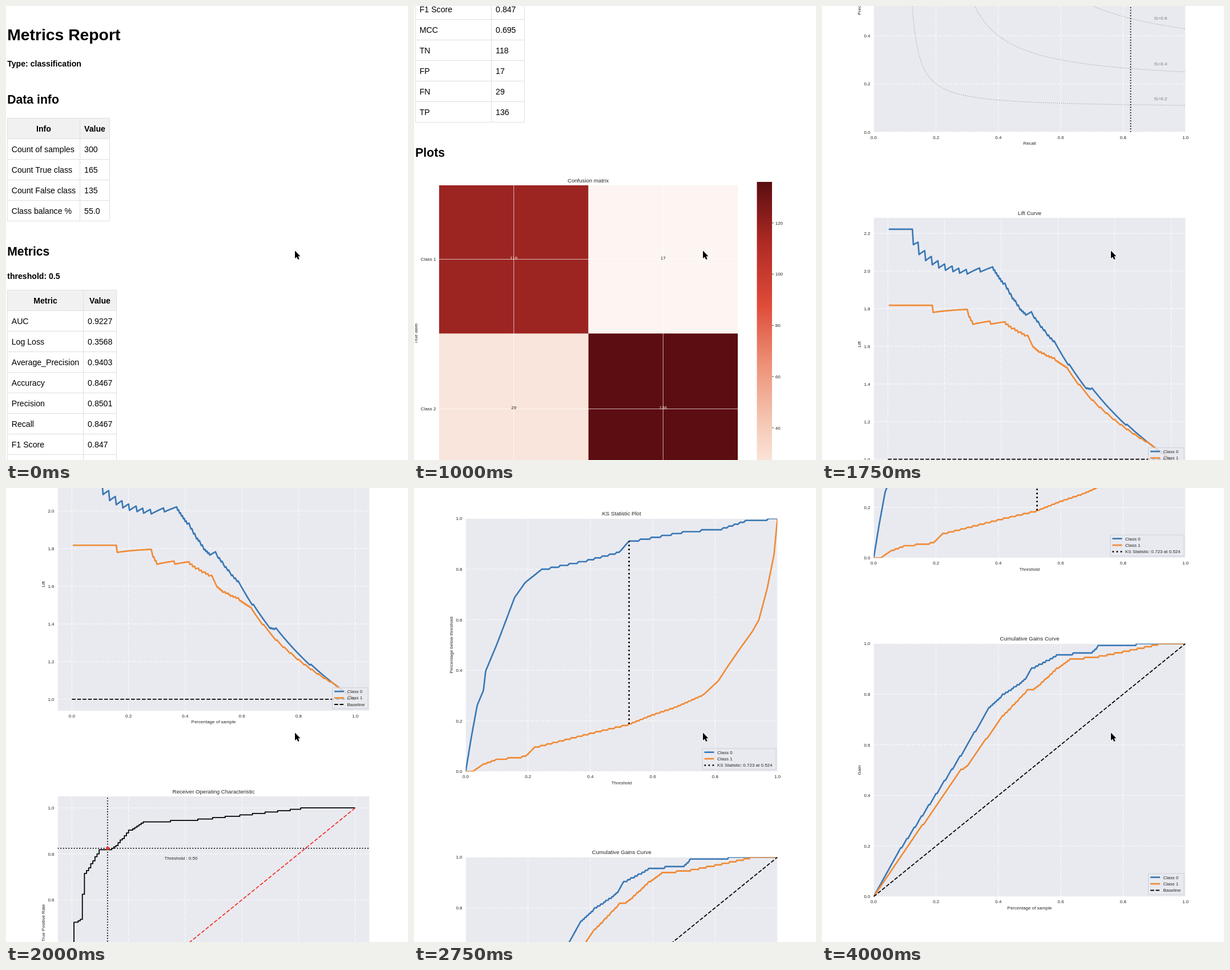
An HTML page with a canvas for the animation above (4.25 s loop, 704 by 795 pixels).

```html
<!DOCTYPE html>
<html lang="en">
<head>
<meta charset="utf-8">
<title>Metrics Report</title>
<style>
  html, body { margin: 0; width: 100%; height: 100%; overflow: hidden; background: #fff; }
  canvas { display: block; }
</style>
</head>
<body>
<canvas id="stage" width="704" height="795"></canvas>
<script>
const ctx = document.getElementById('stage').getContext('2d');
const BLUE = '#3a78b4', ORANGE = '#f08b36', RED = '#f0352b', INK = '#262626';
const LEFT = 90.5, WIDTH = 546, HEIGHT = 443;

// Linear interpolation through [input, output] key points
function interpolate(keys, v) {
  const i = keys.findIndex(([at]) => at >= v);
  if (i < 0) return keys[keys.length - 1][1];
  if (i === 0) return keys[0][1];
  const [[a, from], [b, to]] = [keys[i - 1], keys[i]];
  return from + (to - from) * (v - a) / (b - a);
}

// y is the middle of the capital letters
function text(str, x, y, { size = 8, align = 'left', color = INK, bold = false, angle = 0 } = {}) {
  ctx.save();
  ctx.translate(x, y);
  ctx.rotate(angle);
  ctx.font = `${bold ? 'bold ' : ''}${size}px "Liberation Sans", Arial, sans-serif`;
  ctx.textAlign = align;
  ctx.fillStyle = color;
  ctx.fillText(str, 0, size * 0.358);
  ctx.restore();
}

function line(points, color = '#000', width = 1.6, dash = []) {
  ctx.strokeStyle = color;
  ctx.lineWidth = width;
  ctx.lineJoin = 'round';
  ctx.setLineDash(dash.map(d => d * width));
  ctx.beginPath();
  points.forEach(([x, y]) => ctx.lineTo(x, y));
  ctx.stroke();
  ctx.setLineDash([]);
}

function box(x, y, w, h, fill, stroke) {
  ctx.fillStyle = fill;
  ctx.fillRect(x, y, w, h);
  if (!stroke) return;
  ctx.strokeStyle = stroke;
  ctx.lineWidth = 1;
  ctx.strokeRect(x, y, w, h);
}

function clipTo(x, y, w, h, draw) {
  ctx.save();
  ctx.beginPath();
  ctx.rect(x, y, w, h);
  ctx.clip();
  draw();
  ctx.restore();
}

function table(top, divider, right, rows) {
  const left = 2.5, row = 36, bottom = top + row * rows.length;
  const cell = { size: 14.15, color: '#000' }, head = { ...cell, bold: true, align: 'center' };
  box(left, top, right - left, row, '#f1f1f1');
  rows.forEach(([name, value], i) => {
    const y = top + row * i, mid = y + 18.5;
    line([[left, y], [right, y]], '#dfdfdf', 1);
    text(name, i ? 9.7 : (left + divider) / 2, mid, i ? cell : head);
    text(value, i ? divider + 7.6 : (divider + right) / 2, mid, i ? cell : head);
  });
  line([[left, bottom], [right, bottom]], '#dfdfdf', 1);
  [left, divider, right].forEach(x => line([[x, top], [x, bottom]], '#dfdfdf', 1));
}

function heading(str, y, size) {
  text(str, 2.2, y, { size, bold: true, color: '#000' });
}

function confusionMatrix(top) {
  const left = 44, side = 261.5, grid = '#ffffffb0';
  const cells = [[[118, '#9c2522'], [17, '#fdf5f1']], [[29, '#f9e5db'], [136, '#5c0d11']]];
  const colX = c => left + side * (c + .5), rowY = r => top + 129.5 + 262 * r;
  text('Confusion matrix', 305, top - 8.5, { size: 9.6, align: 'center' });
  cells.forEach((row, r) => row.forEach(([, color], c) =>
    box(left + side * c, top + 259.5 * r, side, 263, color)));
  for (const i of [0, 1]) {
    line([[colX(i), top], [colX(i), top + 522]], grid, 1);
    line([[left, rowY(i)], [left + 2 * side, rowY(i)]], grid, 1);
    text(`Class ${i + 1}`, 38.5, rowY(i), { align: 'right' });
  }
  cells.forEach((row, r) => row.forEach(([n], c) =>
    text(n, colX(c), rowY(r) - 2.5, { align: 'center', color: n > 100 ? '#f6e6e2' : INK })));
  clipTo(2, top, 20, 523, () =>
    text('True label', 2.8, top + 259.5, { align: 'center', angle: -Math.PI / 2 }));

  const barTop = top - 6, barHeight = 534;
  const fade = ctx.createLinearGradient(0, barTop, 0, barTop + barHeight);
  ['#5a0d11', '#af2a24', '#de4a38', '#ed9277', '#f5cab8', '#fff5f0']
    .forEach((color, i) => fade.addColorStop(i / 5, color));
  box(600.5, barTop, 26.5, barHeight, fade);
  for (let n = 20; n <= 120; n += 20) {
    const y = barTop + (136 - n) * 4.487;
    line([[627, y], [630, y]], INK, 0.8);
    text(n, 632.7, y);
  }
}

// Dash patterns are in units of the line width
const DOTS = [1, 1.65], DASHES = [3.7, 1.6], DASH_DOT = [6.4, 1.6, 1, 1.6];

// Draws axes and grid, then calls draw with a data-to-pixel mapping
function chart(top, { title, xLabel, yLabel, xLim = [0, 1], yLim = [0, 1], yTicks = [0, 1], legend }, draw) {
  const bottom = top + HEIGHT, middle = LEFT + WIDTH / 2;
  const X = v => LEFT + WIDTH * (v - xLim[0]) / (xLim[1] - xLim[0]);
  const Y = v => bottom - HEIGHT * (v - yLim[0]) / (yLim[1] - yLim[0]);
  const ticks = (from, to, mark) => { for (let v = from; v < to + .01; v += .2) mark(v); };
  const plot = (points, ...style) => line(points.map(([x, y]) => [X(x), Y(y)]), ...style);

  clipTo(LEFT, top, WIDTH, HEIGHT, () => {
    box(LEFT, top, WIDTH, HEIGHT, '#e9eaf0');
    ticks(0, 1, v => line([[X(v), bottom], [X(v), top]], '#fff', .89, DASH_DOT));
    ticks(...yTicks, v => line([[LEFT, Y(v)], [LEFT + WIDTH, Y(v)]], '#fff', .89, DASH_DOT));
    draw(plot, X, Y);
  });

  ticks(0, 1, v => text(v.toFixed(1), X(v), bottom + 9, { align: 'center' }));
  ticks(...yTicks, v => text(v.toFixed(1), 84.5, Y(v), { align: 'right' }));
  text(title, middle, top - 8.5, { size: 9.6, align: 'center' });
  text(xLabel, middle, bottom + 19.5, { align: 'center' });
  text(yLabel, 65, top + HEIGHT / 2, { align: 'center', angle: -Math.PI / 2 });

  if (!legend) return;
  const first = bottom - 11 - 11.4 * (legend.items.length - 1);
  box(legend.left, first - 6.5, 634 - legend.left, bottom + 3 - first, '#e9eaf0cc', '#cfcfd6');
  legend.items.forEach(([label, color, width, dash, marker], i) => {
    const y = first + 11.4 * i, x = legend.left + 3.5;
    line([[x, y], [x + 17, y]], color, width, dash);
    if (marker) box(x + 5.5, y - 3, 6, 6, '#000');
    text(label, legend.left + 26, y);
  });
}

// Samples ranked by score: the walk of [negatives, positives] passes these corners
const TOTAL = 300, POSITIVE = 165, NEGATIVE = 135;
const CORNERS = [[0, 0], [0, 47], [1, 83], [5, 86], [5, 103], [6, 118], [13, 135], [17, 135],
  [20, 137], [27, 149], [34, 155], [60, 157], [92, 162], [109, 165], [135, 165]];

function walk(corners) {
  const path = [[0, 0]];
  let [fp, tp] = path[0];
  corners.slice(1).forEach(([fpEnd, tpEnd], i) => {
    const [fpStart, tpStart] = corners[i];
    const climb = goal => { while (tp < goal) path.push([fp, ++tp]); };
    while (fp < fpEnd) {
      path.push([++fp, tp]);
      climb(Math.floor(tpStart + (tpEnd - tpStart) * (fp - fpStart) / (fpEnd - fpStart)));
    }
    climb(tpEnd);
  });
  return path;
}

const ranked = walk(CORNERS);
const gain1 = ranked.map(([, tp], n) => [n / TOTAL, tp / POSITIVE]);
const gain0 = ranked.map((_, n) => [n / TOTAL, 1 - ranked[TOTAL - n][0] / NEGATIVE]);
const lift = gain => gain.slice(1).map(([x, g]) => [x, g / x]);
const roc = ranked.map(([fp, tp]) => [fp / NEGATIVE, tp / POSITIVE]);
const precision = ranked.map(([, tp], n) => [tp / POSITIVE, n ? tp / n : 1]);

// Share of samples below a score, rising one sample at a time; keys are [share, score]
function shareBelow(keys, count) {
  const curve = [[0, 0]];
  for (let k = 1; k <= count; k++) {
    const score = interpolate(keys, k / count), [last] = curve[curve.length - 1];
    curve.push([Math.max(last, score - .006), (k - 1) / count], [score, k / count]);
  }
  return [...curve, [1, 1]];
}
const below0 = shareBelow([[0, 0], [.135, .018], [.262, .037], [.321, .057], [.397, .064], [.506, .101],
  [.6, .13], [.688, .157], [.749, .192], [.8, .244], [.837, .392], [.87, .495], [.911, .524],
  [.927, .601], [.95, .705], [.963, .826], [.993, .899], [1, .971]], NEGATIVE);
const below1 = shareBelow([[0, .022], [.03, .057], [.05, .101], [.062, .194], [.097, .222], [.158, .419],
  [.188, .524], [.226, .601], [.257, .676], [.305, .764], [.358, .81], [.409, .837], [.481, .877],
  [.551, .918], [.598, .94], [.723, .967], [.858, .989], [1, 1]], POSITIVE);

const PADDED = [-0.05, 1.05], THIN = 1.33, MEDIUM = 1.78, THICK = 2.67;
const CLASSES = [['Class 0', BLUE, THICK], ['Class 1', ORANGE, THICK]];
const BASELINE = ['Baseline', '#000', MEDIUM, DASHES];

function thresholdMark(plot, X, Y, x, y, low) {
  plot([[x, low], [x, 1.05]], '#000', MEDIUM, DOTS);
  plot([[low, y], [1.05, y]], '#000', MEDIUM, DOTS);
  ctx.fillStyle = RED;
  ctx.beginPath();
  ctx.arc(X(x), Y(y), 3, 0, 7);
  ctx.fill();
}

function drawPage() {
  heading('Metrics Report', 50, 28.3);
  heading('Type: classification', 101, 14.1);
  heading('Data info', 163, 21.2);
  table(196.5, 129.5, 181.5, [['Info', 'Value'], ['Count of samples', '300'], ['Count True class', '165'],
    ['Count False class', '135'], ['Class balance %', '55.0']]);
  heading('Metrics', 429, 21.2);
  heading('threshold: 0.5', 473, 14.1);
  table(497.5, 135.5, 193.5, [['Metric', 'Value'], ['AUC', '0.9227'], ['Log Loss', '0.3568'],
    ['Average_Precision', '0.9403'], ['Accuracy', '0.8467'], ['Precision', '0.8501'], ['Recall', '0.8467'],
    ['F1 Score', '0.847'], ['MCC', '0.695'], ['TN', '118'], ['FP', '17'], ['FN', '29'], ['TP', '136']]);
  heading('Plots', 1018, 21.2);
  confusionMatrix(1076);

  const top = i => 1714.5 + 593 * i;

  chart(top(0), {
    title: 'Calibration plots (Reliability Curves)', xLabel: 'Mean predicted value', yLabel: 'Fraction of positives',
    xLim: PADDED, yLim: PADDED,
    legend: { left: 533, items: [['Perfectly calibrated', '#000', THIN, DOTS], ['Classifier 1', '#000', THIN, [], true]] }
  }, (plot, X, Y) => {
    const points = [[.041, .096], [.145, .103], [.229, .466], [.349, .556], [.463, .545],
      [.539, .571], [.657, .8], [.755, .8], [.855, .839], [.969, .988]];
    plot([[0, 0], [1, 1]], '#000', THIN, DOTS);
    plot(points, INK, THIN);
    points.forEach(([x, y]) => box(X(x) - 3, Y(y) - 3, 6, 6, '#000'));
  });

  chart(top(1), {
    title: 'Precision and Recall Curve (Threshold = 0.5)', xLabel: 'Recall', yLabel: 'Precision', yLim: [0, 1.05]
  }, (plot, X, Y) => {
    for (const f of [.2, .4, .6, .8]) {
      const iso = x => f * x / (2 * x - f), curve = [];
      for (let x = f / 2 + .005; x < 1.01; x += .005) curve.push([x, iso(x)]);
      plot(curve, '#aaa', THIN, DOTS);
      text(`f1=${f}`, X(.9), Y(iso(.919) + .02) - 3, { color: '#777' });
    }
    plot([[0, .8426], [1, .8426]], RED, MEDIUM, DASHES);
    plot(precision, '#000', MEDIUM);
    thresholdMark(plot, X, Y, 136 / POSITIVE, 136 / 154, 0);
    text('Threshold : 0.50', 461, top(1) + 80.5, { align: 'center' });
  });

  chart(top(2), {
    title: 'Lift Curve', xLabel: 'Percentage of sample', yLabel: 'Lift',
    xLim: PADDED, yLim: [.939, 2.283], yTicks: [1, 2.2],
    legend: { left: 571.5, items: [...CLASSES, BASELINE] }
  }, plot => {
    plot(lift(gain0), BLUE, THICK);
    plot(lift(gain1), ORANGE, THICK);
    plot([[0, 1], [1, 1]], '#000', MEDIUM, DASHES);
  });

  chart(top(3), {
    title: 'Receiver Operating Characteristic', xLabel: 'False Positive Rate', yLabel: 'True Positive Rate',
    xLim: PADDED, yLim: PADDED
  }, (plot, X, Y) => {
    plot(roc, '#000', MEDIUM);
    plot([[0, 0], [1, 1]], RED, MEDIUM, DASHES);
    thresholdMark(plot, X, Y, 17 / NEGATIVE, 136 / POSITIVE, PADDED[0]);
    text('Threshold : 0.50', 306.5, top(3) + 108.5, { align: 'center' });
  });

  chart(top(4), {
    title: 'KS Statistic Plot', xLabel: 'Threshold', yLabel: 'Percentage below threshold',
    legend: { left: 505, items: [...CLASSES, ['KS Statistic: 0.723 at 0.524', '#000', THICK, DOTS]] }
  }, plot => {
    plot(below0, BLUE, THICK);
    plot(below1, ORANGE, THICK);
    plot([[.524, .188], [.524, .911]], '#000', THICK, DOTS);
  });

  chart(top(5), {
    title: 'Cumulative Gains Curve', xLabel: 'Percentage of sample', yLabel: 'Gain',
    legend: { left: 571.5, items: [...CLASSES, BASELINE] }
  }, plot => {
    plot(gain0, BLUE, THICK);
    plot(gain1, ORANGE, THICK);
    plot([[0, 0], [1, 1]], '#000', MEDIUM, DASHES);
  });
}

function drawCursor() {
  const arrow = new Path2D('M506 428.5v13.6l3.1-2.9 2.2 4.8 2.3-1-2.1-4.7h4z');
  ctx.strokeStyle = '#fff';
  ctx.lineWidth = 1.6;
  ctx.stroke(arrow);
  ctx.fillStyle = '#000';
  ctx.fill(arrow);
}

// The page scrolls in flicks, shown in steps of 250 ms
const LOOP = 4250, STEP = 250;
const SCROLL = [[250, 0], [500, 73], [1000, 762], [1250, 1682], [2000, 2953.5],
  [2500, 3759], [2750, 4033], [3250, 4325], [3500, 4407]];
let shown = -1;

function tick() {
  const time = performance.now() % LOOP;
  const step = Math.floor(time / STEP);
  if (step !== shown) {
    shown = step;
    ctx.clearRect(0, 0, 704, 795);
    ctx.save();
    ctx.translate(0, -interpolate(SCROLL, step * STEP));
    drawPage();
    ctx.restore();
    drawCursor();
  }
  requestAnimationFrame(tick);
}
tick();
</script>
</body>
</html>
```
